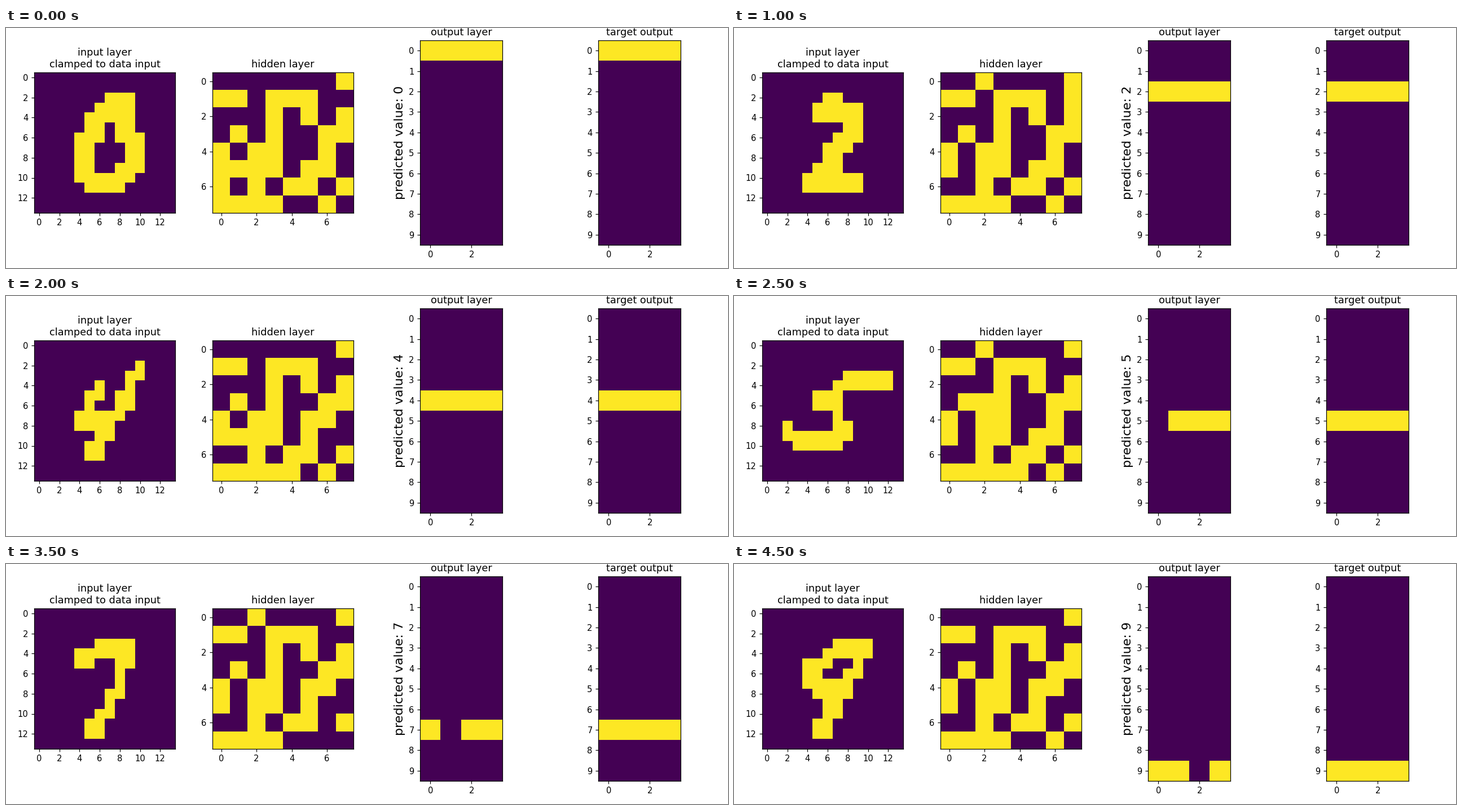
Animation of 1280x427 px, one loop 5 s. Source, as a matplotlib script:

```python
import math

import matplotlib.pyplot as plt
import numpy as np
from matplotlib.animation import FuncAnimation

W, H, DPI = 1280, 427, 128
SCALE = 5 / 6  # default point sizes relative to a 12 inch wide figure

plt.rcParams.update({
    "font.family": "DejaVu Sans",
    "font.size": 10 * SCALE,
    "axes.titlesize": 12 * SCALE,
    "axes.titlepad": 6 * SCALE,
    "axes.labelsize": 15 * SCALE,
    "axes.labelpad": 4 * SCALE,
    "axes.linewidth": 0.8 * SCALE,
    "image.cmap": "viridis",
})
for axis in ("xtick", "ytick"):
    plt.rcParams.update({
        f"{axis}.labelsize": 10 * SCALE,
        f"{axis}.major.size": 3.5 * SCALE,
        f"{axis}.major.pad": 3.5 * SCALE,
        f"{axis}.major.width": 0.8 * SCALE,
    })


def draw(size, strokes, pen_width=1, pen_height=1):
    """Drag a rectangular pen along (x, y) polylines on a square grid."""
    grid = np.zeros((size, size))
    for points in strokes:
        for (x0, y0), (x1, y1) in zip(points, points[1:] or points):
            steps = max(abs(x1 - x0), abs(y1 - y0), 1)
            for step in range(steps + 1):
                x = math.floor(x0 + (x1 - x0) * step / steps + 0.5)
                y = math.floor(y0 + (y1 - y0) * step / steps + 0.5)
                grid[y:y + pen_height, x:x + pen_width] = 1
    return grid


def handwritten(*strokes, pen=1):
    return draw(14, strokes, pen_width=pen, pen_height=2)


inputs = [
    handwritten([(7, 2), (5, 4), (4, 6), (4, 9), (5, 10), (7, 10), (9, 8),
                 (9, 6), (8, 5), (8, 2)], pen=2),
    handwritten([(8, 2), (8, 3), (7, 3), (7, 10), (6, 10), (6, 6)]),
    handwritten([(5, 3), (6, 2), (8, 3), (8, 5), (4, 10), (8, 10)], pen=2),
    handwritten([(2, 4), (3, 4), (4, 3), (9, 3), (9, 4), (6, 6), (9, 6),
                 (9, 9), (7, 11), (4, 11)]),
    handwritten([(6, 4), (5, 5), (4, 7), (7, 7), (8, 5), (9, 5), (9, 3), (10, 2)],
                [(7, 8), (6, 8), (6, 10), (5, 10)]),
    handwritten([(12, 3), (8, 3), (7, 4), (5, 5), (7, 5), (7, 8), (8, 8),
                 (6, 9), (4, 9), (2, 8)]),
    handwritten([(8, 2), (5, 6), (5, 9), (6, 10), (8, 9), (8, 8), (6, 7)], pen=2),
    handwritten([(4, 4), (6, 3), (9, 3), (9, 4), (8, 5), (8, 7), (6, 10),
                 (6, 11), (5, 11)]),
    handwritten([(8, 2), (6, 2), (5, 4), (8, 8), (7, 10), (5, 9), (8, 4), (8, 2)],
                pen=2),
    handwritten([(10, 3), (7, 3), (6, 4), (4, 5), (4, 6), (5, 7), (8, 7),
                 (8, 6), (9, 5)],
                [(7, 9), (6, 9), (6, 11), (5, 11)]),
]

# Hidden units that are on for every digit.
ALWAYS_ON = draw(8, [
    [(0, 1), (1, 1)],
    [(5, 2), (5, 1), (3, 1), (3, 5)],
    [(7, 2), (7, 3), (6, 3), (6, 4), (4, 6), (5, 6)],
    [(0, 4), (0, 5)],
    [(2, 4), (2, 7)],
    [(0, 7), (3, 7)],
    [(7, 0)], [(1, 3)], [(7, 6)],
])

# Hidden units (x, y) that respond only to some digits.
SELECTIVE = {
    (2, 0): "123578", (7, 1): "123", (2, 3): "15",
    (5, 4): "4789", (1, 5): "04", (6, 5): "02356",
    (0, 6): "03", (4, 7): "1456", (6, 7): "024569",
}

# Column of the output unit that stays off.
SILENT = {3: 2, 5: 0, 7: 1, 9: 2}


def layers(digit):
    hidden = ALWAYS_ON.copy()
    for (x, y), digits in SELECTIVE.items():
        if str(digit) in digits:
            hidden[y, x] = 1
    target = np.zeros((10, 4))
    target[digit] = 1
    output = target.copy()
    if digit in SILENT:
        output[digit, SILENT[digit]] = 0
    return inputs[digit], hidden, output, target


fig = plt.figure(figsize=(W / DPI, H / DPI), dpi=DPI, facecolor="white")


def add_panel(index, title, grid):
    """Centre a panel in its slot; square grids are wide, the others tall."""
    rows, cols = grid.shape
    square = rows == cols
    width, height = (250, 250) if square else (146, 364)
    left, top = 175 + 316 * index - width / 2, 204 - height / 2
    ax = fig.add_axes([left / W, 1 - (top + height) / H, width / W, height / H])
    image = ax.imshow(grid, vmin=0, vmax=1, aspect="auto", interpolation="nearest")
    ax.set_xticks(range(0, cols, 2))
    ax.set_yticks(range(0, rows, 2 if square else 1))
    ax.set_title(title)
    return image


titles = ["input layer\nclamped to data input", "hidden layer",
          "output layer", "target output"]
images = [add_panel(i, title, grid)
          for i, (title, grid) in enumerate(zip(titles, layers(0)))]
prediction = images[2].axes.set_ylabel("predicted value: 0")


def update(digit):
    for image, grid in zip(images, layers(digit)):
        image.set_data(grid)
    prediction.set_text(f"predicted value: {digit}")
    return [*images, prediction]


anim = FuncAnimation(fig, update, frames=len(inputs), interval=500,
                     repeat=True, repeat_delay=0, blit=False)
plt.show()
```
